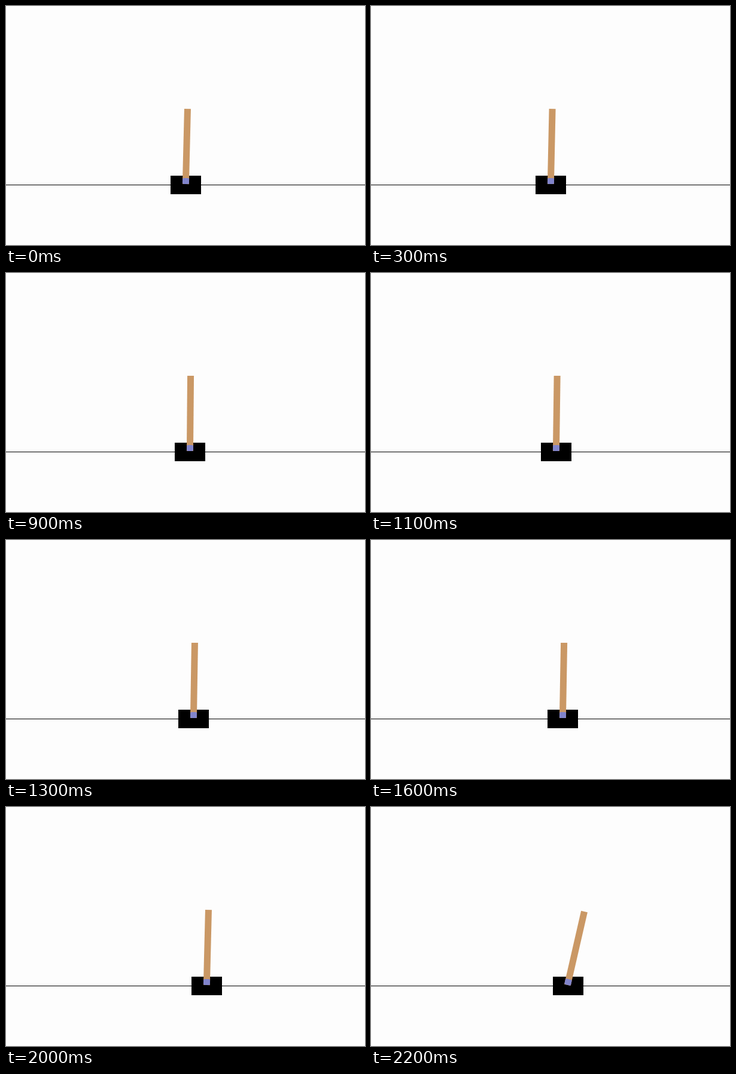
An HTML page that plays this animation: 600 px wide and 400 px high, repeating every 2300 ms.

```html
<!DOCTYPE html>
<html lang="en">
<head>
<meta charset="utf-8">
<title>Cart and pole</title>
<style>
  html, body { margin: 0; width: 100%; height: 100%; overflow: hidden; background: #fdfdfd; }
  svg { display: block; width: 600px; height: 400px; }
</style>
</head>
<body>
<svg viewBox="0 0 600 400">
  <rect y="299" width="600" height="1"/>
  <g id="cart">
    <rect y="284" width="51" height="31"/>
    <g id="pole">
      <rect x="20" y="172" width="11" height="126" fill="#ca9865"/>
      <rect x="20" y="288" width="11" height="10" rx="2" fill="#8184cb"/>
    </g>
  </g>
</svg>
<script>
  const STEP = 100, STEPS = 23;
  // Key poses: step, left edge of the cart, lean of the pole in degrees
  const poses = [
    [0, 275, 1.4], [2, 274, 1.3], [6, 278, 1], [9, 282, 0.5], [12, 285, 0.9],
    [16, 295, 1], [18, 297, 1.4], [20, 310, 1.4], [22, 304, 12.9]
  ];
  const cart = document.getElementById("cart");
  const pole = document.getElementById("pole");
  const start = performance.now();
  const mix = (a, b, u) => a + (b - a) * u;

  function poseAt(step) {
    const next = Math.max(1, poses.findIndex(p => p[0] >= step));
    const [s0, x0, lean0] = poses[next - 1];
    const [s1, x1, lean1] = poses[next];
    const u = (step - s0) / (s1 - s0);
    // The last stretch is the fall, which gathers speed
    const v = next === poses.length - 1 ? u * u : u;
    return [Math.round(mix(x0, x1, v)), mix(lean0, lean1, v)];
  }

  function draw() {
    const step = Math.floor((performance.now() - start) / STEP) % STEPS;
    const [x, lean] = poseAt(step);
    cart.setAttribute("transform", `translate(${x} 0)`);
    pole.setAttribute("transform", `rotate(${lean} 25.5 293)`);
    requestAnimationFrame(draw);
  }
  draw();
</script>
</body>
</html>
```
